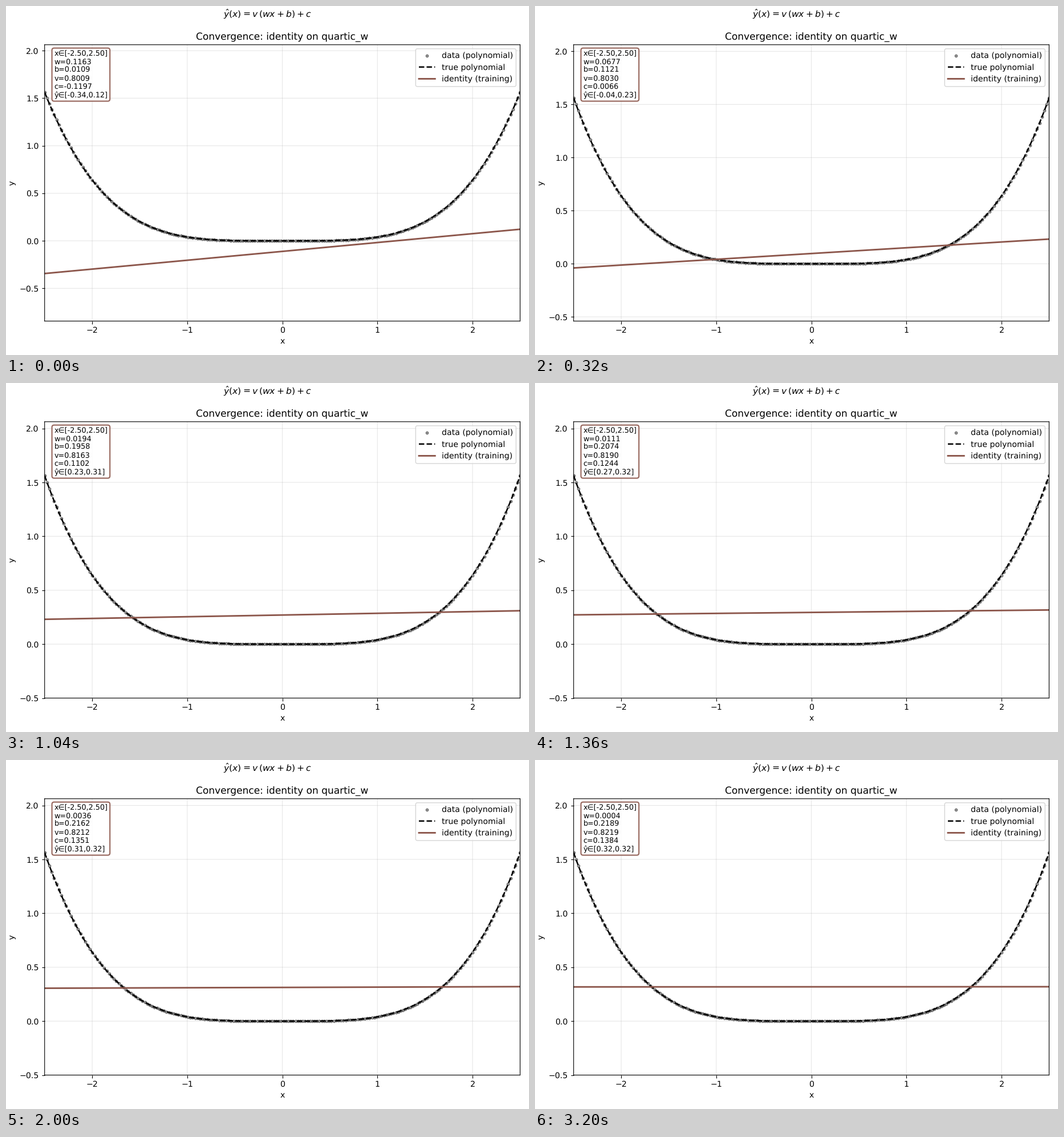
Recreate the animation shown at these times as a matplotlib script. Size 917x611 px, loop 3.28 s.

```python
import numpy as np
import matplotlib.pyplot as plt
from matplotlib.animation import FuncAnimation

plt.rcParams["text.hinting"] = "none"

W, H, DPI = 917, 611, 917 / 9
FRAMES, INTERVAL = 41, 80
STEPS, RATE = 25, 0.002
BROWN = "#8c564b"


def quartic(x):
    return 0.04 * x**4


x = np.linspace(-2.5, 2.5, 200)
y = quartic(x)
x_fine = np.linspace(-2.5, 2.5, 401)
y_fine = quartic(x_fine)


def train():
    """Gradient descent on the mean squared error, one snapshot per frame."""
    w, b, v, c = 0.1163, 0.0109, 0.8009, -0.1197
    history = []
    for _ in range(FRAMES):
        history.append((w, b, v, c))
        for _ in range(STEPS):
            hidden = w * x + b
            err = 2 * (v * hidden + c - y)
            dw, db = v * np.mean(err * x), v * np.mean(err)
            dv, dc = np.mean(err * hidden), np.mean(err)
            w, b = w - RATE * dw, b - RATE * db
            v, c = v - RATE * dv, c - RATE * dc
    return history


history = train()

fig = plt.figure(figsize=((W + 0.01) / DPI, (H + 0.01) / DPI), dpi=DPI)
left, right, top, bottom = 67.7, 901.4, 67.8, 551.6
ax = fig.add_axes([left / W, 1 - bottom / H, (right - left) / W, (bottom - top) / H])
fig.suptitle(r"$\hat{y}(x) = v\,(wx+b)+c$", fontsize=11, y=0.995)

ax.scatter(x, y, s=10, color="black", alpha=0.4, label="data (polynomial)")
ax.plot(x_fine, y_fine, "--", color="black", lw=1.8, label="true polynomial")
fit, = ax.plot([], [], color=BROWN, lw=2, label="identity (training)")
info = ax.text(
    0.02, 0.98, "", transform=ax.transAxes, fontsize=9, va="top", linespacing=1.187,
    bbox=dict(boxstyle="round,pad=0.3", fc="white", ec=BROWN, lw=1.5, alpha=0.9),
)
ax.set_title("Convergence: identity on quartic_w")
ax.set_xlabel("x")
ax.set_ylabel("y")
ax.set_xlim(-2.5, 2.5)
ax.set_xticks(range(-2, 3))
ax.set_yticks(np.arange(-0.5, 2.1, 0.5))
ax.grid(alpha=0.3)
legend = ax.legend(loc="upper right")

# Keep thin lines at sub-pixel positions.
ticks = ax.xaxis.get_major_ticks() + ax.yaxis.get_major_ticks()
marks = [part for t in ticks for part in (t.tick1line, t.gridline)]
for part in [*ax.spines.values(), *marks, *legend.get_lines(), legend.get_frame()]:
    part.set_snap(False)


def update(i):
    w, b, v, c = history[i]
    pred = v * (w * x_fine + b) + c
    fit.set_data(x_fine, pred)
    ax.set_ylim(min(0, pred.min()) - 0.5, max(y_fine.max(), pred.max()) + 0.5)
    info.set_text(
        f"x∈[{x[0]:.2f},{x[-1]:.2f}]\n"
        f"w={w:.4f}\nb={b:.4f}\nv={v:.4f}\nc={c:.4f}\n"
        f"ŷ∈[{pred.min():.2f},{pred.max():.2f}]"
    )
    return fit, info


anim = FuncAnimation(fig, update, frames=FRAMES, interval=INTERVAL, repeat=True)
plt.show()
```
